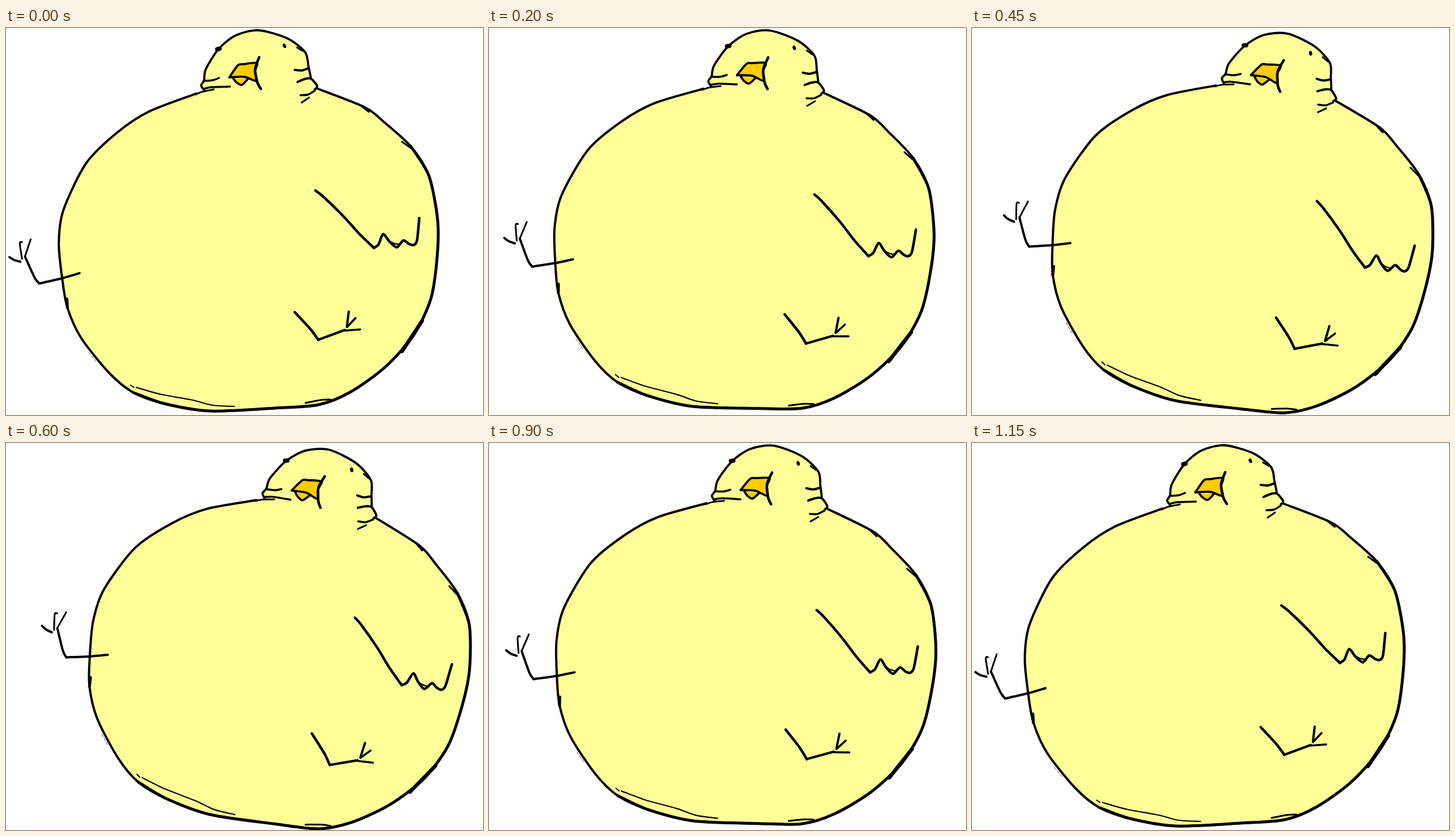
Animation, 831 px wide and 674 px high, one loop 1200 ms. Source, as an HTML page with a canvas:

```html
<!DOCTYPE html>
<html lang="en">
<head>
<meta charset="utf-8">
<title>Rocking chick</title>
<style>
  html, body { margin: 0; height: 100%; overflow: hidden; background: #fff; }
  canvas { display: block; width: 100vw; height: 100vh; }
</style>
</head>
<body>
<canvas width="831" height="674"></canvas>
<script>
const ctx = document.querySelector('canvas').getContext('2d');
const YELLOW = '#ffff99', ORANGE = '#ffcc00', BLACK = '#000';
const STEP = 50, STEPS = 24, PEAK = 11, TILT = 11.8 * Math.PI / 180;
const PIVOT_X = 460.5, PIVOT_Y = 658;

// Outlines as x, y pairs, anticlockwise.
const body = [
  332,114, 250,145, 195,181, 140,235, 100,317, 92,375, 98,437, 107,487, 131,540,
  180,601, 222,635, 275,654, 355,667, 468,662, 545,656, 600,634, 660,591, 710,535,
  740,472, 751,400, 752,335, 737,258, 706,207, 660,165, 625,138, 541,105
];
const head = [
  531,86, 527,67, 521,42, 490,18, 440,4, 400,13, 370,37, 348,72, 345,91, 340,100, 345,108
];

// Smooth curve through all points.
function trace(p) {
  const k = .14, last = p.length - 2;
  ctx.beginPath();
  ctx.moveTo(p[0], p[1]);
  for (let i = 0; i < last; i += 2) {
    const a = Math.max(i - 2, 0), b = Math.min(i + 4, last);
    ctx.bezierCurveTo(
      p[i] + k * (p[i + 2] - p[a]), p[i + 1] + k * (p[i + 3] - p[a + 1]),
      p[i + 2] - k * (p[b] - p[i]), p[i + 3] - k * (p[b + 1] - p[i + 1]),
      p[i + 2], p[i + 3]);
  }
}

function fill(color, ...points) {
  trace(points);
  ctx.fillStyle = color;
  ctx.fill();
}

function ink(width, ...points) {
  trace(points);
  ctx.lineWidth = width;
  ctx.stroke();
}

function drawBody() {
  fill(YELLOW, ...body, 541,97, ...head);
  ink(4, ...body);
  ink(5, ...body.slice(20, 46));
  ink(6.5, 690,563, 725,510);
  ink(5, 106,472, 107,487);
  ink(3, 522,653, 548,648, 565,647);
  ink(3, 618,135, 632,146);
  ink(3, 690,198, 705,209);
  ink(2, 217,622, 223,626);
  ink(2.2, 227,626, 270,638, 325,648, 360,657, 398,659);
  for (let i = 0; i < 3; i++) ink(.7, 144 + 5 * i, 565 + 6 * i, 147 + 5 * i, 569 + 6 * i);
}

function drawHead() {
  ink(3.8, ...head);
  ink(7.5, 368,37, 372,36);
  ink(3, 507,34, 517,40);
  ink(3.5, 345,92, 360,91, 371,87);
  ink(3.5, 345,106, 358,103, 390,102);
  ink(3, 330,116, 342,111, 362,107);
  ink(4, 503,73, 515,74, 527,70);
  ink(4, 508,94, 520,89, 531,88, 542,101, 538,107);
  ink(3.5, 513,117, 526,116, 538,109);
  ink(3, 515,130, 528,121);
  const low = [396,88, 402,95, 411,99, 422,88];
  const top = [389,86, 404,65, 414,63, 437,61, 434,75, 436,92, 415,85, 389,86];
  for (const part of [low, top]) {
    fill(ORANGE, ...part);
    ink(3.8, ...part);
  }
  ink(4.5, 441,51, 434,72, 438,95, 444,106);
  ctx.beginPath();
  ctx.ellipse(485, 31, 2.8, 4.2, -.4, 0, 7);
  ctx.fillStyle = BLACK;
  ctx.fill();
}

function drawLimbs() {
  // wing
  ink(4.5, 539,283, 552,293, 587,327, 615,358, 641,383);
  ink(4.5, 641,383, 649,377, 657,359, 668,372, 681,382, 692,370, 702,376, 710,378, 716,370, 720,331);
  ink(2.5, 666,370, 675,375, 686,377);
  // right foot
  ink(4.5, 503,495, 530,524, 544,543);
  ink(4.2, 544,543, 590,526);
  ink(3.5, 590,527, 617,525);
  ink(4, 597,494, 594,520);
  ink(3.5, 594,521, 609,505);
  // left foot
  ink(4, 128,427, 97,436, 58,445);
  ink(4, 58,445, 50,435, 33,398);
  ink(3, 33,398, 43,368);
  ink(3, 28,373, 24,375, 28,402);
  ink(4, 6,399, 14,404, 25,407);
}

function frame(now) {
  const n = Math.floor(now / STEP) % STEPS;
  const lean = n <= PEAK ? n / PEAK : (STEPS - 1 - n) / (STEPS - 1 - PEAK);
  ctx.clearRect(0, 0, 831, 674);
  ctx.save();
  ctx.translate(PIVOT_X, PIVOT_Y);
  ctx.rotate(TILT * lean);
  ctx.translate(-PIVOT_X, -PIVOT_Y);
  drawBody();
  drawHead();
  drawLimbs();
  ctx.restore();
  requestAnimationFrame(frame);
}

ctx.lineCap = ctx.lineJoin = 'round';
ctx.strokeStyle = BLACK;
requestAnimationFrame(frame);
</script>
</body>
</html>
```
